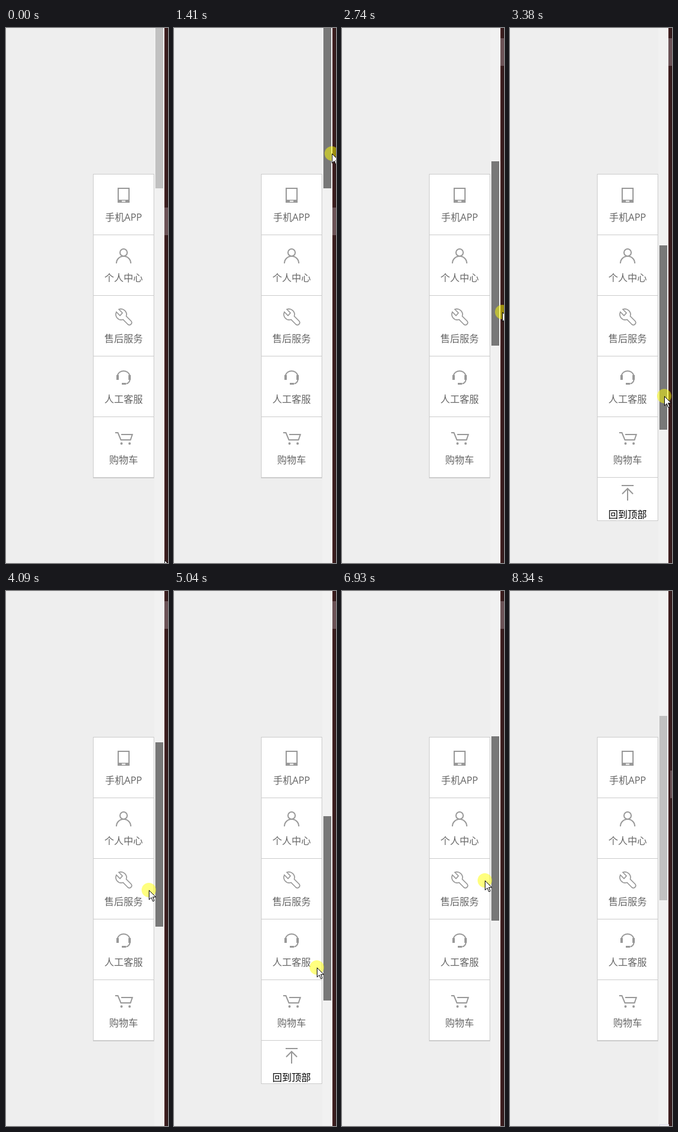
An HTML page for the animation above (8.42 s loop, 270 by 891 pixels).

```html
<!DOCTYPE html>
<html lang="zh-CN">
<head>
<meta charset="utf-8">
<title>侧边工具栏</title>
<style>
html, body { margin: 0; width: 100%; height: 100%; overflow: hidden; background: #eee; }
svg { display: block; }
text { font: 16px "Open Sans", "Noto Sans CJK SC", "Noto Sans CJK", sans-serif; text-anchor: middle; fill: #666; }
.icon { fill: none; stroke: #999; stroke-width: 2; }
.solid { fill: #999; stroke: none; }
.frame { fill: #fff; stroke: #ccc; }
</style>
</head>
<body>
<svg width="270" height="891" viewBox="0 0 270 891">
  <defs>
    <linearGradient id="dark">
      <stop stop-color="#462324"/>
      <stop offset="1" stop-color="#2e1718"/>
    </linearGradient>
  </defs>
  <rect width="270" height="891" fill="#eee"/>
  <rect x="247" width="17" height="891" fill="#f1f1f1"/>
  <rect x="264" width="6" height="891" fill="url(#dark)"/>
  <rect id="block" width="6" height="46" fill="#6b5256"/>
  <rect id="corner" x="249.5" y="888.5" width="15" height="6" fill="#f4f3f8" stroke="#dcdae6"/>
  <rect id="thumb" x="249" width="13" height="307"/>

  <rect class="frame" x="145.5" y="243.5" width="101" height="505"/>
  <path d="M145 344.5h102m-102 101h102m-102 101h102m-102 101h102m-102 102h102" stroke="#ccc"/>

  <g class="icon">
    <path d="M187 267h18v23h-18z"/>
    <path class="solid" d="M186 286h20v5h-20z"/>
    <path d="M193 288.5h6" stroke="#fff"/>

    <circle cx="196" cy="374" r="6"/>
    <path d="M184 392a12 12 0 0 1 24 0"/>

    <path stroke-width="1.7" d="M188 468.5l6 6-4 4.5-6-6a9 9 0 0 0 11 12.500l8 8a3.900 3.900 0 0 0 5.500-5.500l-8-8a9.500 9.500 0 0 0-12.500-11.500z"/>

    <path d="M185.5 579a11 11 0 0 1 21 0M206.5 586q-1 5-6 6.500"/>
    <path class="solid" d="M184 578h4v8h-4zM204 578h4v8h-4zM193 591h7v3h-7z"/>

    <path d="M182 674h4.500l5 12h16l3-9H192"/>
    <circle class="solid" cx="192.500" cy="692" r="2"/>
    <circle class="solid" cx="206" cy="692" r="2"/>
  </g>
  <text x="196" y="321">手机APP</text>
  <text x="196" y="422">个人中心</text>
  <text x="196" y="523">售后服务</text>
  <text x="196" y="624">人工客服</text>
  <text x="196" y="725">购物车</text>

  <g id="toTop">
    <rect class="frame" x="145.5" y="748.5" width="101" height="72"/>
    <path class="icon" d="M186 762h20M187 776l9-9 9 9M196 767v20"/>
    <text x="196" y="816" style="fill:#000">回到顶部</text>
  </g>

  <g id="cursor">
    <circle id="press" r="12" fill="#ff0" opacity=".5"/>
    <path d="M.5.5v15.500l3.700-3.400 2.600 6.200 2.400-1-2.600-6.100h5z" fill="#fff" stroke="#000"/>
  </g>
</svg>
<script>
const LOOP = 8420, STEP = 78;
const PRESS = 1410, RELEASE = 7250, RESET = 8260;
const GRIP = 249, THUMB = 307;
const [block, corner, thumb, toTop, cursor, press] =
  ["block", "corner", "thumb", "toTop", "cursor", "press"].map(id => document.getElementById(id));

// Strokes: first change, last change, value reached
const enterY = [[70, 860, 220], [930, 1110, 209]];
const leaveY = [[RELEASE, 7650, 450]];
const sway = [
  [70, 390, 220], [470, 860, 253], [930, 1110, 263], [1490, 2740, 267],
  [3140, 3620, 252], [3780, 4090, 238], [RELEASE, 7650, 226]
];
const drags = [
  [1490, 2190, 79], [2290, 2740, 222], [2820, 3060, 306], [3140, 3620, 387],
  [3780, 4250, 222], [4560, 5200, 399], [5350, 5830, 202], [6070, 6620, 424],
  [6770, 7010, 208]
];

const ease = p => p * (1.5 - p / 2);

// The screen refreshes in steps; a stroke's first step lands on its start time.
function track(t, value, strokes) {
  for (const [from, to, goal] of strokes) {
    if (t < from) break;
    const gaps = Math.round((to - from) / STEP);
    const step = Math.floor((t - from) / (to - from) * gaps + 1.2);
    value += (goal - value) * ease(Math.min(1, step / (gaps + 1)));
  }
  return value;
}

const thumbTop = t => track(t, -40, drags);

function pointerY(t) {
  if (t < PRESS) return track(t, 886, enterY);
  const top = thumbTop(t);
  const lead = 0.18 * (top - thumbTop(t - STEP));
  return top + GRIP + lead + track(t, 0, leaveY);
}

const show = (el, on) => el.setAttribute("visibility", on ? "visible" : "hidden");

function draw(now) {
  const t = now % LOOP;
  const x = track(t, 264, sway), y = pointerY(t), top = thumbTop(t);
  const pressed = t >= PRESS && t < RELEASE;
  const hover = x >= 247 && x < 264 && y >= top && y < top + THUMB;
  const reset = t >= RESET;

  thumb.setAttribute("y", Math.round(top));
  thumb.setAttribute("fill", pressed ? "#787878" : hover ? "#a8a8a8" : "#c1c1c1");
  cursor.setAttribute("transform", `translate(${Math.round(x)} ${Math.round(y)})`);
  show(press, pressed);
  show(toTop, top > 280);
  show(corner, reset);

  block.setAttribute("x", reset ? 267 : 264);
  block.setAttribute("y", reset || t < 1490 ? 299 : 17);
}

const begin = performance.now();
function loop() {
  draw(performance.now() - begin);
  requestAnimationFrame(loop);
}
loop();
</script>
</body>
</html>
```
